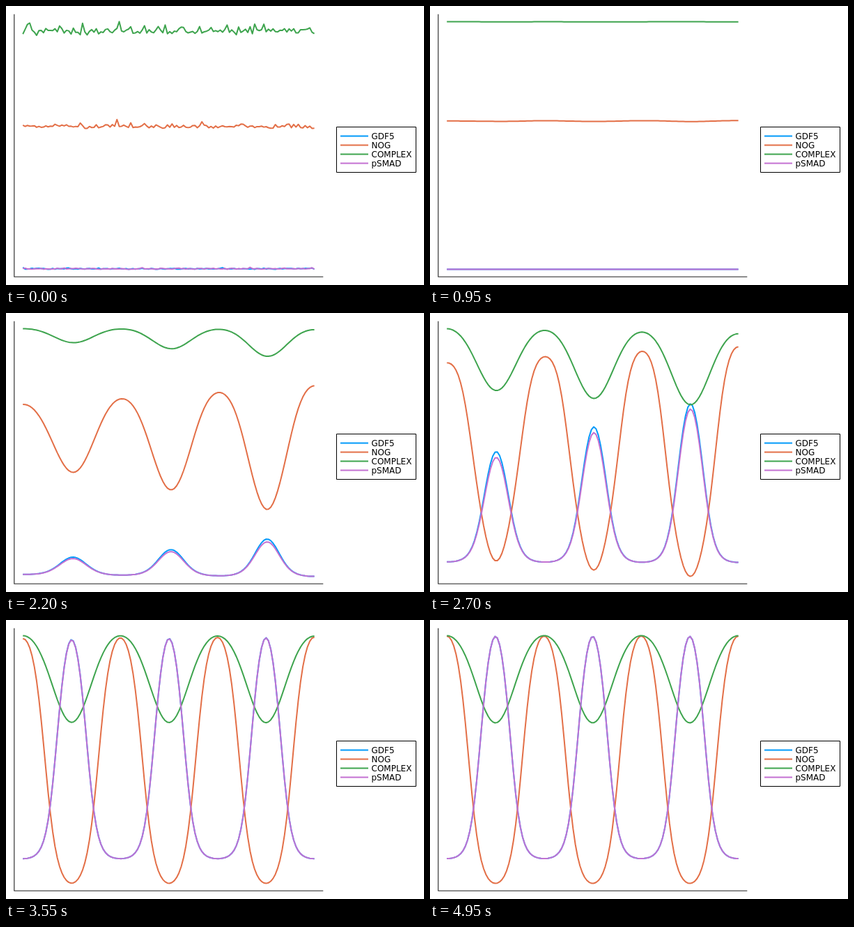
Animation of 600 by 400 pixels, one loop 5.05 s. Source, as an HTML page with a canvas:

```html
<!DOCTYPE html>
<html lang="en">
<head>
<meta charset="utf-8">
<style>
  html, body { margin: 0; height: 100%; overflow: hidden; background: #fff; }
  canvas { display: block; }
</style>
</head>
<body>
<canvas id="stage" width="600" height="400"></canvas>
<script>
const ctx = document.getElementById('stage').getContext('2d');
const { PI, exp, log, cos, sin, min, max, abs, floor } = Math;
const LOOP = 5050, STEP = 50, POINTS = 128;
const LEFT = 24.2, WIDTH = 418.4, TOP = 22.4, BOTTOM = 377.6;
const LEAD = 255; // ms by which the right end runs ahead of the left end

const species = [
  { label: 'GDF5', color: '#009afa', noise: 1.8 },
  { label: 'NOG', color: '#e36f47', noise: 8.8 },
  { label: 'COMPLEX', color: '#3ea44e', noise: 11.5 },
  { label: 'pSMAD', color: '#c371d2', noise: 1.8 }
];

const mix = (a, b, w) => a + (b - a) * w;
const sigmoid = z => 1 / (1 + exp(-z));
// Logistic growth from one level to another, halfway at time mid.
const grow = (from, to, t, mid, width) => mix(from, to, sigmoid((t - mid) / width));
// Rises from 0 to 1 as c goes from -1 to 1.
const bell = (c, k, b) => (sigmoid(k * c + b) - sigmoid(b - k)) / (sigmoid(b + k) - sigmoid(b - k));

let seed = 77;
const random = () => (seed = (seed * 16807) % 2147483647) / 2147483647;
const skewed = () => log(random() * random() * random() * random() * random() * random());

const indices = Array.from({ length: POINTS }, (_, i) => i);
const mode = (m, i) => cos(m * PI * (i + 0.5) / POINTS);

// White noise split into cosine modes, so that each can diffuse at its own rate.
for (const s of species) {
  const values = indices.map(skewed);
  const mean = values.reduce((a, b) => a + b) / POINTS;
  const peak = max(...values.map(v => abs(v - mean)));
  s.modes = indices.map(m =>
    values.reduce((sum, v, i) => sum + v * mode(m, i), 0) * 2 / POINTS * s.noise / peak);
}

function noiseAt(modes, i, t) {
  let sum = 0;
  for (let m = 1; m < POINTS; m++) {
    const fade = 1.3e-5 * m * m * t;
    if (fade > 12) break;
    sum += modes[m] * mode(m, i) * exp(-fade);
  }
  return sum * exp(-t / 600);
}

// c is 1 between the fingers and -1 on them.
function spike(age, base, c) {
  const peak = grow(334, 23.5, age, 2645, 195);
  const size = min(1, max(0.001, (base - peak) / 318)), k = 2.6 * size ** 0.2;
  return mix(base, peak, bell(-c, k, 2.5 * size - 2.1 - k));
}

function nog(age, c) {
  const low = grow(147.7, 377.6, age, 2315, 185);
  const high = grow(147.7, 23, age, 2420, 285);
  const size = (low - high) / 355;
  const round = (1 + c) / 2 + 0.28 * size * (1 - c * c);
  return mix(low, high, mix(round, bell(c, 2.2, -0.55), size ** 3));
}

function complex(age, c, q, t) {
  const low = grow(TOP, 147.5, age, 2470, 198);
  const sag = sigmoid((t - 2800) / 200);
  const high = TOP + 30 * q * sag * (1 - sag);
  return mix(low, high, (1 + c) / 2 + 0.1 * (1 - c * c));
}

function curvesAt(t) {
  const curves = species.map(() => []);
  const drift = 2.5 / WIDTH * min(1, exp((2200 - t) / 1000));
  for (const i of indices) {
    const q = i / (POINTS - 1), age = t + LEAD * (q - 0.5);
    const c = cos(6 * PI * (q - drift * sin(PI * q)));
    const base = grow(334, 342, age, 2200, 200);
    [spike(age, base, c), nog(age, c), complex(age, c, q, t), spike(age - 20, base, c)]
      .forEach((y, n) => curves[n].push(y + noiseAt(species[n].modes, i, t)));
  }
  // The vertical axis always fits the data.
  const all = curves.flat(), lo = min(...all), hi = max(...all);
  return curves.map(ys => ys.map(y => TOP + (y - lo) / (hi - lo) * (BOTTOM - TOP)));
}

function stroke(points, color, width) {
  ctx.beginPath();
  points.forEach(([x, y]) => ctx.lineTo(x, y));
  ctx.strokeStyle = color;
  ctx.lineWidth = width;
  ctx.stroke();
}

function draw(t) {
  ctx.fillStyle = '#fff';
  ctx.fillRect(0, 0, 600, 400);
  ctx.lineJoin = 'round';
  stroke([[11.8, 11.8], [11.8, 388.2], [455.3, 388.2]], '#222', 1.1);
  curvesAt(t).forEach((ys, n) =>
    stroke(ys.map((y, i) => [LEFT + i / (POINTS - 1) * WIDTH, y]), species[n].color, 2));

  ctx.strokeStyle = '#000';
  ctx.lineWidth = 1;
  ctx.strokeRect(474.5, 173.5, 114, 65);
  ctx.font = '12px "DejaVu Sans", sans-serif';
  species.forEach(({ label, color }, n) => {
    const y = 186.6 + 13 * n;
    stroke([[480, y], [520, y]], color, 2);
    ctx.fillStyle = '#000';
    ctx.fillText(label, 524.5, y + 4.4);
  });
}

let shown = -1;
function tick() {
  const t = floor(performance.now() % LOOP / STEP) * STEP;
  const step = t < 100 ? 0 : min(t, 4950);
  if (step !== shown) draw(shown = step);
  requestAnimationFrame(tick);
}
tick();
</script>
</body>
</html>
```
